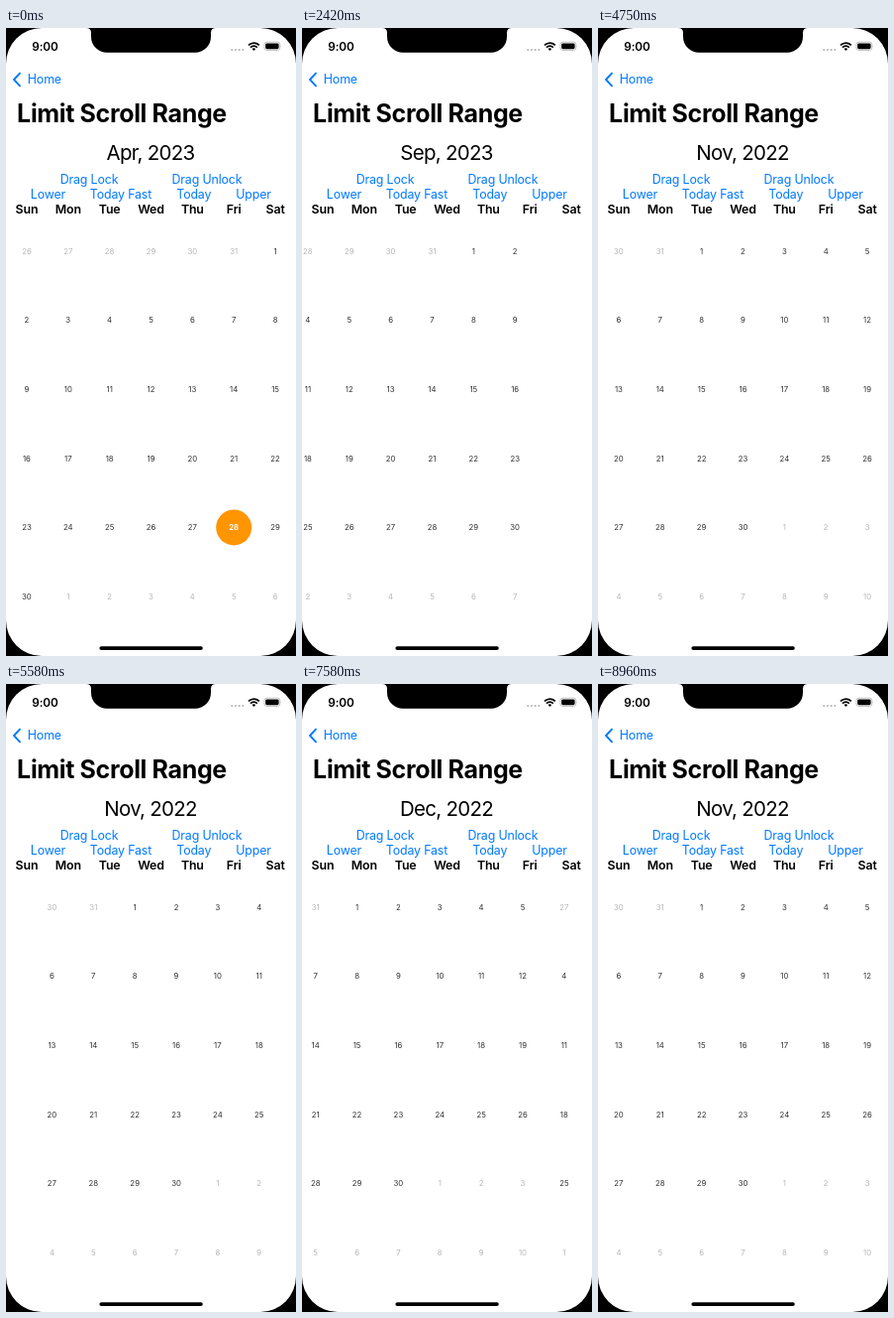
An HTML page that plays this animation: 293x633 px, repeating every 9.09 s.

```html
<!DOCTYPE html>
<html lang="en">
<head>
<meta charset="utf-8">
<title>Limit Scroll Range</title>
<style>
  html, body { margin: 0; height: 100%; overflow: hidden; background: #000; }
  svg { display: block; width: 100vw; height: 100vh; }
  text { font-family: Inter, Roboto, sans-serif; font-size: 12.4px; letter-spacing: -0.012em; text-anchor: middle; }
  .start { text-anchor: start; }
  .link { fill: #007aff; }
  .heading { font-size: 25px; font-weight: 700; letter-spacing: -0.014em; }
  .month { font-size: 20.5px; letter-spacing: -0.036em; }
  .bold { font-weight: 600; }
  .day { font-size: 7.8px; letter-spacing: 0; fill: #303030; }
  .outside { fill: #b6b6b6; }
  .today { fill: #fff; font-weight: 700; }
</style>
</head>
<body>
<svg viewBox="0 0 293 633">
  <defs><clipPath id="screen"><rect width="293" height="633" rx="36"/></clipPath></defs>
  <g clip-path="url(#screen)">
    <rect width="293" height="633" fill="#fff"/>
    <g id="strip"></g>
    <g id="labels"></g>

    <text class="start bold" x="26.3" y="22.8" style="font-size:11.8px">9:00</text>
    <path d="M228.3 22h12" stroke="#b5b5b5" stroke-width="2.2" stroke-linecap="round" stroke-dasharray="0 3.7"/>
    <g fill="none" stroke="#000" stroke-width="1.7">
      <path d="M245 17.3a7.6 7.6 0 0 1 10.8 0M247 19.6a4.8 4.8 0 0 1 6.8 0"/>
    </g>
    <path d="M248.6 21.1a2.5 2.5 0 0 1 3.6 0l-1.8 1.8z"/>
    <rect x="261" y="14.2" width="15.8" height="8.2" rx="2.4" fill="none" stroke="#b0b0b0" stroke-width=".8"/>
    <rect x="262.2" y="15.4" width="13.4" height="5.8" rx="1.4"/>
    <path d="M277.7 17q1.3 1.3 0 2.6z" fill="#b0b0b0"/>

    <path d="M14 45.6 8 52l6 6.4" fill="none" stroke="#007aff" stroke-width="1.9" stroke-linecap="round" stroke-linejoin="round"/>
    <text class="start link" x="21.8" y="56.3">Home</text>
    <text class="start heading" x="11.1" y="95">Limit Scroll Range</text>
    <text class="month" id="month" x="146" y="133.3"></text>

    <path d="M81 0q5 0 5 5v3.7a16 16 0 0 0 16 16h89a16 16 0 0 0 16-16v-3.7q0-5 5-5z"/>
    <rect x="94.4" y="623.2" width="104.4" height="3.8" rx="1.9"/>
  </g>
</svg>
<script>
const LOOP = 9090, WIDTH = 293, COLUMN = WIDTH / 7, ROW = 69.6;
const FIRST = -5, LAST = 5; // months counted from April 2023
const strip = document.getElementById('strip');
const labels = document.getElementById('labels');
const month = document.getElementById('month');

function add(parent, tag, attributes, content = '') {
  const node = document.createElementNS('http://www.w3.org/2000/svg', tag);
  for (const name in attributes) node.setAttribute(name, attributes[name]);
  node.textContent = content;
  return parent.appendChild(node);
}

const columnX = i => COLUMN * (i + 0.5);
const monthDate = (page, day = 1) => new Date(2023, 3 + page, day);

function buildPage(page) {
  const group = add(strip, 'g', { transform: `translate(${page * WIDTH})` });
  const first = monthDate(page);
  for (let i = 0; i < 42; i++) {
    const date = monthDate(page, 1 - first.getDay() + i);
    const x = columnX(i % 7), y = 225 + ROW * Math.floor(i / 7);
    const inside = date.getMonth() === first.getMonth();
    const today = page === 0 && inside && date.getDate() === 28;
    if (today) add(group, 'circle', { cx: x, cy: y, r: 18, fill: '#ff9500' });
    const kind = today ? 'today' : inside ? '' : 'outside';
    add(group, 'text', { class: 'day ' + kind, x, y: y + 2.7 }, date.getDate());
  }
}
for (let page = FIRST; page <= LAST; page++) buildPage(page);

'Sun Mon Tue Wed Thu Fri Sat'.split(' ').forEach((name, i) =>
  add(labels, 'text', { class: 'bold', x: columnX(i), y: 187.3 }, name));
[['Drag Lock', 84, 157], ['Drag Unlock', 203, 157], ['Lower', 42.5, 172.2],
 ['Today Fast', 116, 172.2], ['Today', 189.8, 172.2], ['Upper', 250, 172.2]]
  .forEach(([name, x, y]) => add(labels, 'text', { class: 'link', x, y }, name));

const clamp = u => Math.min(1, Math.max(0, u));

// Programmatic scroll: 300 ms ease in and out
function jump(t, start) {
  const u = clamp((t - start) / 300);
  return u < 0.5 ? 2 * u * u : 1 - 2 * (1 - u) ** 2;
}

// Remaining distance of a critically damped spring
const damped = v => (1 + v) * Math.exp(-v);

// Swipe that settles on the next page
const swipe = (t, start) => 1 - damped(Math.max(0, t - start) * 0.0167);

// Pull past the limit, then spring back
function pull(t, start, release, peak) {
  if (t < release) return peak * (1 - (1 - clamp((t - start) / (release - start))) ** 2);
  const offset = peak * damped((t - release) * 0.012);
  return Math.abs(offset) < 1 ? 0 : offset;
}

function scrollPages(t) {
  return LAST * jump(t, 1220) + (FIRST - LAST) * jump(t, 4140)
    + swipe(t, 6223) - swipe(t, 7390);
}

function overscroll(t) {
  if (t >= 8960) return 0;
  return pull(t, 2220, 2550, -68) + pull(t, 4980, 5400, 72) + pull(t, 8290, 8480, 40);
}

function titlePage(t) {
  if (t < 1745) return 0;
  if (t < 4665) return LAST;
  return t >= 6915 && t < 7995 ? FIRST + 1 : FIRST;
}

function draw(now) {
  const t = now % LOOP;
  const tick = t >= 8960 ? 8960 : Math.min(Math.floor((t + 5) * 0.012), 106) / 0.012;
  const x = overscroll(tick) - WIDTH * scrollPages(tick);
  strip.setAttribute('transform', `translate(${x.toFixed(2)})`);
  const date = monthDate(titlePage(tick));
  const title = date.toLocaleString('en-US', { month: 'short' }) + ', ' + date.getFullYear();
  if (month.textContent !== title) month.textContent = title;
}

const begin = performance.now();
function loop() {
  draw(performance.now() - begin);
  requestAnimationFrame(loop);
}
loop();
</script>
</body>
</html>
```
